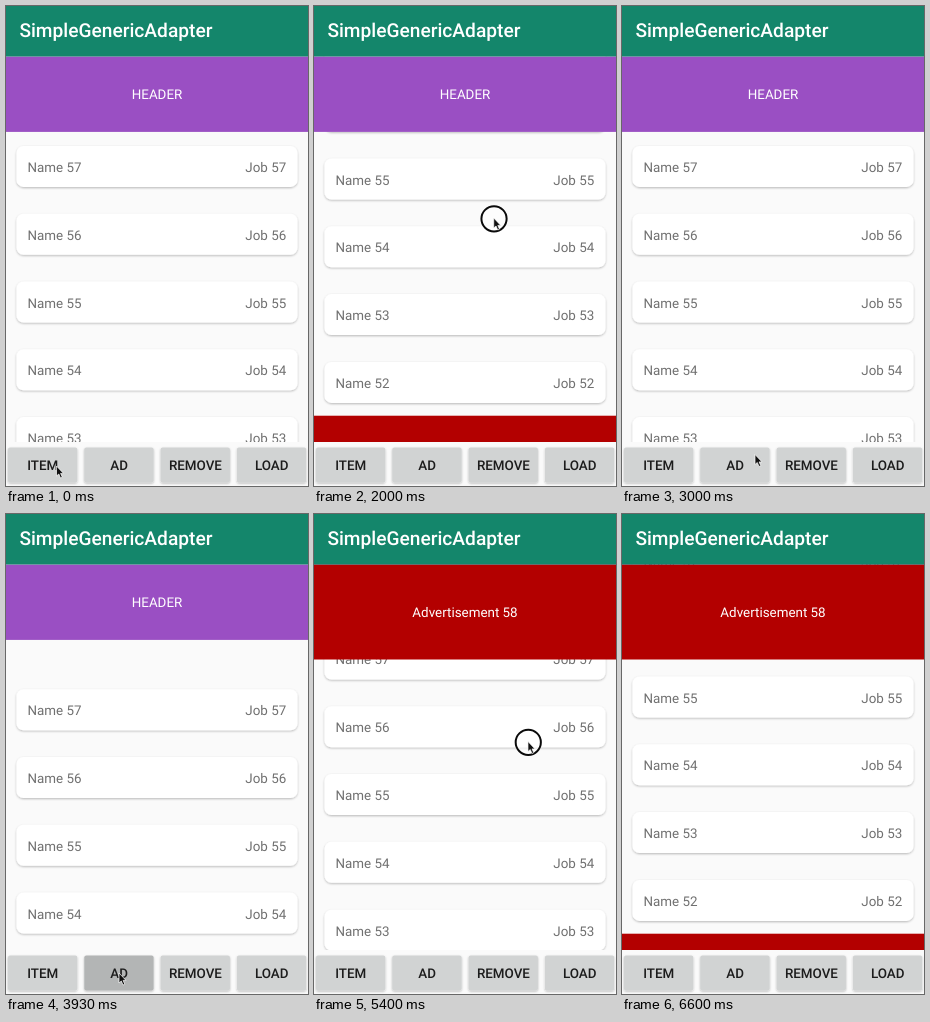
An HTML page for the animation above (6.99 s loop, 302 px wide and 480 px high).

```html
<!DOCTYPE html>
<html lang="en">
<head>
<meta charset="utf-8">
<title>SimpleGenericAdapter</title>
<style>
  html, body { margin: 0; width: 100%; height: 100%; overflow: hidden; background: #fafafa; }
  svg { display: block; width: 100%; height: 100%; }
  text { font: 13.4px Roboto, sans-serif; fill: #fff; text-rendering: geometricPrecision; }
  .title { font-size: 19.15px; font-weight: 500; }
  .label { font-weight: 500; fill: #1c1c1c; }
  .card text { fill: #707070; }
  .mid { text-anchor: middle; }
  .end { text-anchor: end; }
</style>
</head>
<body>
<svg viewBox="0 0 302 480">
  <defs>
    <clipPath id="view"><rect y="50" width="302" height="386"/></clipPath>
    <filter id="soft" x="-10%" y="-30%" width="120%" height="160%">
      <feDropShadow dx="0" dy="1" stdDeviation="0.9" flood-opacity=".27"/>
    </filter>
  </defs>
  <rect width="302" height="480" fill="#fafafa"/>
  <g clip-path="url(#view)">
    <g id="list"></g>
    <g id="sticky"></g>
  </g>
  <rect width="302" height="50.5" fill="#14866b"/>
  <text class="title" x="13.4" y="31.2">SimpleGenericAdapter</text>
  <g id="bar"></g>
  <g id="cursor">
    <circle id="ring" cx=".3" cy=".8" r="12.6" fill="#fff" fill-opacity=".55" stroke="#0a0a0a" stroke-width="2"/>
    <path d="M0 0V10L2.3 8L4 12L5.8 11.2L4.1 7.4H7Z" fill="#111" stroke="#fff" stroke-width=".7"/>
  </g>
</svg>
<script>
const LOOP = 6990, STEP = 1000 / 15;
const TOP = 50.5, HEADER = 75.4, AD = 95, PITCH = 67.8;
const INSERT = 3829, MOVE = 250, FADE = 120;

const smooth = u => u * u * (3 - 2 * u);
const linear = u => u;
const settle = u => 1 - (1 - u) ** 3;

// Each move: start, end, target values, easing
const pointerMoves = [
  [0, 670, [162, 266], smooth],
  [1070, 1400, [176, 336], smooth],
  [1480, 2100, [180, 202.7], smooth],
  [2200, 2800, [176, 336], smooth],
  [2800, 3000, [133, 448.5], smooth],
  [3000, 3200, [113, 459], smooth],
  [4150, 4600, [210, 334.3], smooth],
  [4630, 5930, [216.7, 154], linear],
  [5930, 6200, [226.3, 158], smooth],
  [6200, 6530, [161, 229], smooth]
];
const scrollMoves = [
  [1480, 2100, [132.2], smooth],
  [2200, 2800, [0], smooth],
  [4630, 5930, [186.5], linear],
  [5930, 6200, [208], settle]
];

const $ = id => document.getElementById(id);
const clamp = v => Math.min(1, Math.max(0, v));
const during = (t, a, b) => t >= a && t < b;
const place = (el, x, y) => el.setAttribute('transform', `translate(${x.toFixed(2)} ${y.toFixed(2)})`);

const follow = (moves, from, t) => moves.reduce((at, [start, end, to, ease]) => {
  const u = ease(clamp((t - start) / (end - start)));
  return at.map((v, i) => v + (to[i] - v) * u);
}, from);

function group(parent, html, cls = '') {
  const g = document.createElementNS('http://www.w3.org/2000/svg', 'g');
  g.setAttribute('class', cls);
  g.innerHTML = html;
  parent.appendChild(g);
  return g;
}

const banner = (parent, label, height, color) => group(parent,
  `<rect width="302" height="${height}" fill="${color}"/>
   <text class="mid" x="151" y="${height / 2 + 5.1}">${label}</text>`);

const card = n => group($('list'),
  `<rect x="10.5" y="14" width="281" height="41" rx="7" fill="#fff" filter="url(#soft)"/>
   <text x="21.5" y="40">Name ${n}</text><text class="end" x="280.2" y="40">Job ${n}</text>`, 'card');

const rows = Array.from({ length: 6 }, (_, i) => ({ el: card(57 - i), y: i * PITCH }));
rows.push({ el: banner($('list'), 'Advertisement 51', AD, '#b30000'), y: 6 * PITCH });
const header = banner($('sticky'), 'HEADER', HEADER, '#9a4fc3');
const ad = banner($('sticky'), 'Advertisement 58', AD, '#b30000');

const buttons = ['ITEM', 'AD', 'REMOVE', 'LOAD'].map((label, i) => {
  const x = 2 + i * 76.3;
  return group($('bar'),
    `<rect x="${x}" y="441.5" width="69.3" height="35" rx="2" fill="#d1d3d3" filter="url(#soft)"/>
     <text class="label mid" x="${x + 34.8}" y="463.8">${label}</text>`);
});
const adButton = buttons[1].querySelector('rect');

function render(t) {
  const [x, y] = follow(pointerMoves, [50.5, 460], t);
  const [scroll] = follow(scrollMoves, [0], t);
  const grow = AD * (1 - Math.cos(Math.PI * clamp((t - INSERT) / MOVE))) / 2;
  const alpha = clamp((t - INSERT - MOVE) / FADE);
  const start = TOP + HEADER - scroll;

  for (const row of rows) place(row.el, 0, start + grow + row.y);
  place(header, 0, alpha ? TOP - Math.min(scroll, HEADER) : TOP);
  place(ad, 0, Math.max(TOP, start));
  ad.setAttribute('opacity', alpha);

  adButton.setAttribute('fill', during(t, 3720, 4060) ? '#b3b5b5' : '#d1d3d3');
  place($('cursor'), x, y);
  $('cursor').style.display = t < 6590 ? '' : 'none';
  $('ring').style.display = during(t, 1450, 2800) || during(t, 4620, 6230) ? '' : 'none';
}

function frame() {
  const t = performance.now() % LOOP;
  render(Math.floor((t + 4) / STEP) * STEP);
  requestAnimationFrame(frame);
}
frame();
</script>
</body>
</html>
```
